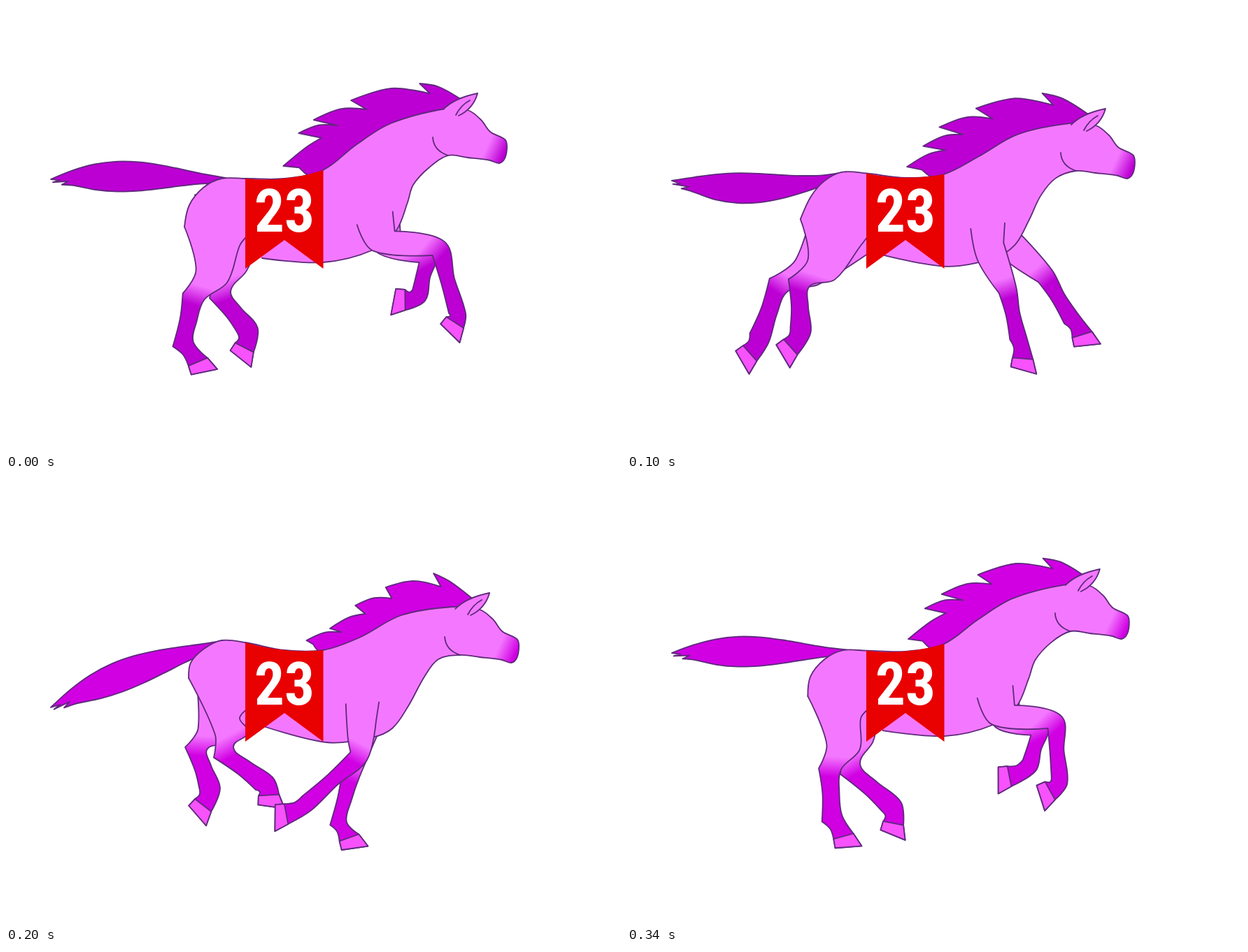
Write an HTML page with a canvas that moves like this. It is 879 by 637 pixels and loops after 360 ms.

```html
<!DOCTYPE html>
<html lang="en">
<head>
<meta charset="utf-8">
<title>Galloping horse</title>
<style>
  html, body { margin: 0; width: 100%; height: 100%; overflow: hidden; background: #fff; }
  canvas { display: block; }
</style>
</head>
<body>
<canvas id="stage" width="879" height="637"></canvas>
<script>
const ctx = document.getElementById('stage').getContext('2d');
const LOOP = 360, STEP = 20;
const SKIN = '#f478ff', HOOF = '#f752fb', LINE = '#5e2a7c', RED = '#e90000';

// Gait: body dip and tail tip height, then knee, fetlock and coronet of each leg.
const GAIT = [
  { time: 0, sway: [0, 248],
    hindNear: [268,416, 253,484, 274,510], hindFar: [306,413, 345,464, 340,489],
    foreNear: [618,347, 645,440, 641,453], foreFar: [602,361, 590,414, 570,420] },
  { time: 60, sway: [13, 247],
    hindNear: [218,419, 176,488, 155,503], hindFar: [270,422, 257,488, 277,510],
    foreNear: [627,395, 679,448, 694,466], foreFar: [620,349, 625,424, 617,440] },
  { time: 100, sway: [22, 250],
    hindNear: [246,396, 248,464, 233,488], hindFar: [217,399, 189,475, 175,497],
    foreNear: [544,407, 559,475, 565,505], foreFar: [598,387, 635,448, 650,471] },
  { time: 140, sway: [33, 283],
    hindNear: [272,395, 302,451, 301,473], hindFar: [207,370, 190,431, 174,452],
    foreNear: [492,424, 482,486, 495,513], foreFar: [570,419, 600,479, 614,504] },
  { time: 200, sway: [38, 327],
    hindNear: [311,391, 369,436, 375,453], hindFar: [272,385, 291,442, 281,467],
    foreNear: [504,397, 430,464, 400,479], foreFar: [493,422, 475,493, 490,514] },
  { time: 280, sway: [23, 316],
    hindNear: [321,392, 391,446, 389,466], hindFar: [316,390, 384,444, 378,462],
    foreNear: [572,369, 535,431, 510,438], foreFar: [534,392, 491,440, 455,452] },
  { time: 340, sway: [4, 249],
    hindNear: [290,415, 293,486, 309,512], hindFar: [319,415, 378,469, 380,493],
    foreNear: [611,348, 618,432, 604,446], foreFar: [589,361, 575,410, 546,425] },
];
const MAX_DIP = 38;

// Trunk from the rump over back and neck, then from throat to belly, at both ends of the dip.
const TRUNK_HIGH = [255,316, 262,285, 282,260, 308,247, 342,247, 398,247, 453,235, 500,199, 550,168, 628,147,
  605,231, 582,256, 574,281, 558,321, 525,349, 453,367, 366,361];
const TRUNK_LOW = [258,287, 264,263, 283,243, 308,231, 342,234, 398,245, 453,245, 505,227, 565,195, 638,183,
  618,258, 598,283, 575,325, 552,357, 523,370, 458,377, 362,352];
const HEAD = [660,149, 679,163, 692,180, 713,191, 716,201, 713,218, 705,225, 692,221, 660,217, 632,214];
// Mane tips: x, sideways swing, y, drop with the body.
const TUFTS = [[600, 12, 111, 24], [515, 30, 135, 20], [466, 36, 163, 18], [438, 27, 182, 32], [411, 20, 229, 2]];
// Hoof corners: toward the toe, toward the ground.
const HOOF_SHAPE = [[-14, 2], [-13, 15], [25, 16], [15, -3]];
const HIND_WIDTHS = [16, 12, 15], FORE_WIDTHS = [13, 10, 12];

const toPoints = flat => flat.flatMap((x, i) => i % 2 ? [] : [[x, flat[i + 1]]]);
const add = ([x, y], [dx, dy], k = 1) => [x + dx * k, y + dy * k];
const lerp = (a, b, k) => [a[0] + (b[0] - a[0]) * k, a[1] + (b[1] - a[1]) * k];
const unit = (a, b) => {
  const dx = b[0] - a[0], dy = b[1] - a[1], length = Math.hypot(dx, dy) || 1;
  return [dx / length, dy / length];
};
const bisect = (d, e) => unit([0, 0], add(d, e));
const rotate = ([x, y], a) => [x * Math.cos(a) - y * Math.sin(a), x * Math.sin(a) + y * Math.cos(a)];
const across = (p, [dx, dy], k) => add(p, [dy, -dx], k);
const sharp = ([x, y]) => [x, y, true];

// Periodic cubic interpolation of one channel of the gait.
function sample(channel, t) {
  const count = GAIT.length;
  const now = GAIT.filter(key => key.time <= t).length - 1;
  const [a, b, c, d] = [-1, 0, 1, 2].map(offset => {
    const i = now + offset, key = GAIT[(i + count) % count];
    return { v: key[channel], t: key.time + LOOP * Math.floor(i / count) };
  });
  const span = c.t - b.t, u = (t - b.t) / span, u2 = u * u, u3 = u2 * u;
  return b.v.map((v, i) => {
    const m0 = (c.v[i] - a.v[i]) / (c.t - a.t) * span;
    const m1 = (d.v[i] - v) / (d.t - b.t) * span;
    return (2 * u3 - 3 * u2 + 1) * v + (u3 - 2 * u2 + u) * m0
      + (3 * u2 - 2 * u3) * c.v[i] + (u3 - u2) * m1;
  });
}

// Smooth open curve through the points, with corners at the sharp ones.
function curve(pts) {
  const path = new Path2D();
  const tangent = i => i === 0 || i === pts.length - 1 || pts[i][2]
    ? [0, 0] : unit(pts[i - 1], pts[i + 1]);
  path.moveTo(pts[0][0], pts[0][1]);
  for (let i = 1; i < pts.length; i++) {
    const [a, b] = [pts[i - 1], pts[i]];
    const k = Math.hypot(b[0] - a[0], b[1] - a[1]) / 3;
    path.bezierCurveTo(...add(a, tangent(i - 1), k), ...add(b, tangent(i), -k), b[0], b[1]);
  }
  return path;
}

function paint(path, fill) {
  if (fill) {
    ctx.fillStyle = fill;
    ctx.fill(path);
  }
  ctx.stroke(path);
}

function blend(from, to, dark) {
  const gradient = ctx.createLinearGradient(...from, ...to);
  gradient.addColorStop(0, SKIN);
  gradient.addColorStop(1, dark);
  return gradient;
}

// rear and front are the outline points above the knee.
function drawLeg(hip, rear, front, [knee, fetlock, coronet], [kneeW, cannonW, fetlockW], dark) {
  const cannon = unit(knee, fetlock), pastern = unit(fetlock, coronet);
  const kneeDir = bisect(unit(hip, knee), cannon);
  const fetlockDir = bisect(cannon, pastern);
  const hoofDir = rotate(pastern, 0.45);
  const shin = lerp(knee, fetlock, 0.5);
  const hoof = HOOF_SHAPE.map(([n, u]) => sharp(add(across(coronet, hoofDir, n), hoofDir, u)));
  const heel = sharp(across(fetlock, fetlockDir, -fetlockW));
  const outline = [...rear,
    sharp(across(knee, kneeDir, -kneeW)), across(shin, cannon, -cannonW), heel,
    across(lerp(heel, hoof[0], 0.5), pastern, 4), ...hoof,
    across(fetlock, fetlockDir, fetlockW), across(shin, cannon, cannonW), across(knee, kneeDir, kneeW),
    ...front];
  paint(curve(outline), blend(add(knee, kneeDir, -18), add(knee, kneeDir, 11), dark));
  const hoofPath = curve(hoof);
  hoofPath.closePath();
  paint(hoofPath, HOOF);
}

function drawHindLeg(channel, t, rump, flank, dark) {
  const joints = toPoints(sample(channel, t));
  const hip = [305, 318], dir = unit(hip, joints[0]);
  const thigh = across(lerp(hip, joints[0], 0.65), dir, 14);
  drawLeg(hip, [rump, across(thigh, dir, -24)], [across(thigh, dir, 24), ...flank],
    joints, HIND_WIDTHS, dark);
}

// The shoulder slides back together with the knee.
function drawForeLeg(channel, t, shift, dark) {
  const joints = toPoints(sample(channel, t));
  const back = (620 - joints[0][0]) / 128;
  const slide = (x, y, dx, dy) => [x + shift - dx * back, y + dy * back];
  const elbow = slide(525, 350, 40, 24), chest = slide(556, 322, 30, 28);
  drawLeg(lerp(elbow, chest, 0.5), [slide(502, 313, 18, 10), elbow],
    [sharp(chest), slide(553, 294, 22, 28)], joints, FORE_WIDTHS, dark);
}

function drawTail(dip, tipY, dark) {
  const root = [314, 250 - dip * 0.4], mid = [190, 244 + dip * 0.75], tip = [64, tipY];
  const bend = lerp(lerp(root, tip, 0.5), mid, 2);
  const width = u => 20 * Math.sin(Math.PI * u ** 1.4) + 4 * (1 - u);
  const edge = (u, k) => {
    const p = lerp(root, bend, u), q = lerp(bend, tip, u);
    return across(lerp(p, q, u), unit(p, q), -k);
  };
  const steps = [0, 1, 2, 3, 4, 5, 6, 7].map(i => i / 8);
  const jags = [0.95, 0.9].flatMap(u => [edge(u, -width(u) * 0.5), edge(u + 0.04, -width(u))]);
  paint(curve([...steps.map(u => edge(u, width(u))), sharp(tip), ...jags.map(sharp),
    ...steps.reverse().map(u => edge(u, -width(u)))]), dark);
}

function drawMane(t, low, start, trunk, dark) {
  const swing = Math.cos(2 * Math.PI * t / LOOP - 0.75);
  const [withers, neck, crest, poll] = trunk.slice(6, 10);
  const anchors = [poll, crest, lerp(crest, neck, 0.5), neck, withers];
  const pts = [start];
  TUFTS.forEach(([x, sway, y, drop], i) => {
    const tip = [x - sway * swing, y + drop * low], last = pts[pts.length - 1];
    pts.push(lerp(last, tip, 0.5).map((v, axis) => v + [(tip[1] - last[1]), (last[0] - tip[0]) * -1][axis] * 0.11));
    pts.push(sharp(tip));
    pts.push(sharp(lerp(tip, anchors[i], 0.4)));
  });
  paint(curve([...pts, [460, 255], add(start, [-8, 43])]), dark);
}

function drawFlag([left, mid, right]) {
  ctx.fillStyle = RED;
  ctx.beginPath();
  ctx.moveTo(342, left[1]);
  ctx.quadraticCurveTo(398, 2 * mid[1] - (left[1] + right[1]) / 2, 453.5, right[1]);
  ctx.lineTo(453.5, 376);
  ctx.lineTo(398, 335);
  ctx.lineTo(342, 376);
  ctx.fill();
  ctx.fillStyle = '#fff';
  ctx.font = '600 condensed 85px "Roboto Condensed", "Open Sans", Roboto, sans-serif';
  ctx.textAlign = 'center';
  ctx.fillText('23', 398, 323);
}

function drawHorse(t) {
  const dark = t < 140 ? '#bc00d4' : '#d000e3';
  const [dip, tailTip] = sample('sway', t);
  const low = dip / MAX_DIP;
  const offset = [dip * 0.45, dip];
  const onHead = p => add(p, offset);
  const trunk = toPoints(TRUNK_HIGH.map((v, i) => v + (TRUNK_LOW[i] - v) * low));
  trunk[0] = add(trunk[0], [-9, 6], Math.sin(2 * Math.PI * t / LOOP));

  ctx.fillStyle = '#fff';
  ctx.fillRect(0, 0, 879, 637);
  ctx.strokeStyle = LINE;
  ctx.lineWidth = 1.8;
  ctx.lineJoin = ctx.lineCap = 'round';

  drawTail(dip, tailTip, dark);
  drawHindLeg('hindFar', t, [270, 270], [[358, 345]], dark);
  drawForeLeg('foreFar', t, 12, dark);
  drawMane(t, low, onHead([648, 132]), trunk, dark);

  const body = [...trunk.slice(0, 10), ...toPoints(HEAD).map(onHead), ...trunk.slice(10)];
  paint(curve(body), blend(onHead([688, 200]), onHead([712, 211]), dark));
  drawHindLeg('hindNear', t, trunk[0], [[334, 343], [344, 330]], dark);
  drawForeLeg('foreNear', t, 0, dark);

  ctx.save();
  ctx.translate(...offset);
  paint(new Path2D('M625 148Q640 132 674 125Q668 147 647 157'), SKIN);
  paint(new Path2D('M643 156Q650 142 663 135M610 188Q611 207 632 214'));
  ctx.restore();

  drawFlag(trunk.slice(4, 7));
}

function tick() {
  drawHorse(Math.floor(performance.now() % LOOP / STEP) * STEP);
  requestAnimationFrame(tick);
}
tick();
</script>
</body>
</html>
```
